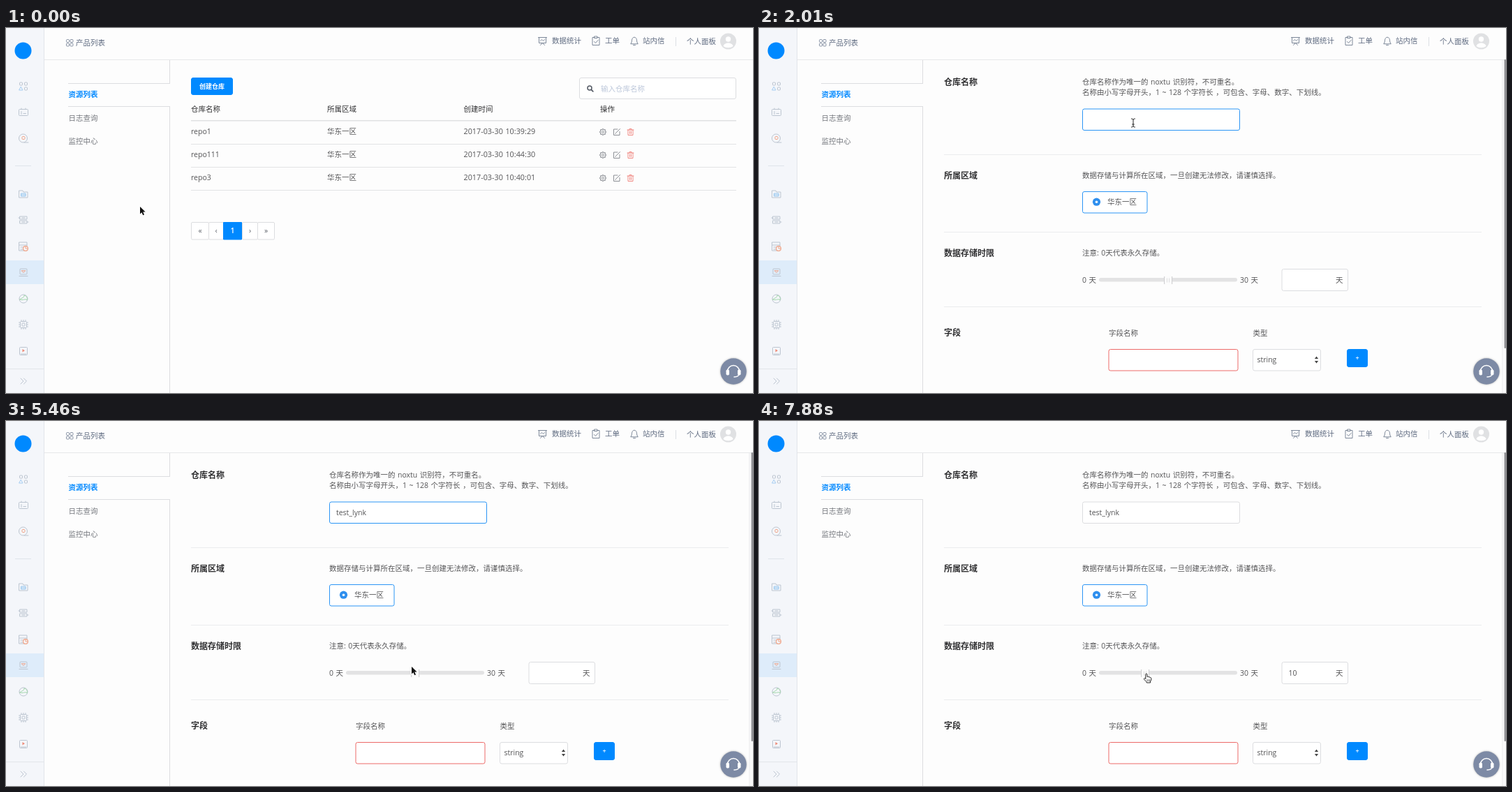
An HTML page with a canvas that plays this animation: 1070x523 px, repeating every 8000 ms.

```html
<!DOCTYPE html>
<html lang="zh-CN">
<head>
<meta charset="utf-8">
<title>创建仓库</title>
<style>
html, body { margin: 0; width: 100%; height: 100%; overflow: hidden; background: #fdfdfd; }
canvas { display: block; width: 1070px; height: 523px; }
</style>
</head>
<body>
<canvas id="stage"></canvas>
<script>
const W = 1070, H = 523, LOOP = 8000;
const BLUE = '#0089ff', INK = '#545456', DARK = '#303032', NAVY = '#5f6b80', RULE = '#e7e8ea', EDGE = '#dcdde0';
const ICON = '#bcc5d0', ORANGE = '#f0a488', RED = '#f08a84';
const FONT = '"Open Sans", "Noto Sans CJK SC", "Noto Sans CJK", sans-serif';

const canvas = document.getElementById('stage');
const c = canvas.getContext('2d');
const dpr = window.devicePixelRatio || 1;
canvas.width = W * dpr;
canvas.height = H * dpr;
c.wordSpacing = '0.8px';

// ---- helpers ----
function text(s, x, y, color = INK, size = 10.5, weight = 400, align = 'left') {
  c.font = `${weight} ${size}px ${FONT}`;
  c.textAlign = align;
  c.fillStyle = color;
  c.fillText(s, x, y + size * 0.37);
}
function rect(x, y, w, h, color) {
  c.fillStyle = color;
  c.fillRect(x, y, w, h);
}
function box(x, y, w, h, fill, stroke, r = 2.5) {
  c.beginPath();
  c.roundRect(x + 0.5, y + 0.5, w - 1, h - 1, r);
  paint(fill, stroke, 1);
}
function pill(x, y, w, h, r, fill) {
  c.beginPath();
  c.roundRect(x, y, w, h, r);
  paint(fill);
}
function paint(fill, stroke, width = 1) {
  if (fill) { c.fillStyle = fill; c.fill(); }
  if (stroke) { c.strokeStyle = stroke; c.lineWidth = width; c.stroke(); }
}
function disc(x, y, r, fill, stroke, width) {
  c.beginPath();
  c.arc(x, y, r, 0, Math.PI * 2);
  paint(fill, stroke, width);
}
// SVG path drawn with its own origin at x, y
function shape(d, x, y, stroke, fill, width = 1) {
  const p = new Path2D(d);
  c.save();
  c.translate(x, y);
  c.lineJoin = c.lineCap = 'round';
  if (fill) { c.fillStyle = fill; c.fill(p); }
  if (stroke) { c.strokeStyle = stroke; c.lineWidth = width; c.stroke(p); }
  c.restore();
}

// ---- timeline: value holds until the next key ----
function at(keys, t) {
  let k = keys[0];
  for (const next of keys) if (next[0] <= t) k = next;
  return k;
}
const pointer = [
  [0, 'arrow', 192, 256], [150, 'arrow', 222, 205], [300, 'arrow', 272, 112], [480, 'hand', 288, 81],
  [780, 'arrow', 407, 135], [930, 'arrow', 437, 136], [1080, 'beam', 510, 137], [1260, 'beam', 536, 136],
  [4710, 'beam', 537, 141], [4860, 'arrow', 544, 168], [5010, 'arrow', 556, 226], [5160, 'arrow', 568, 290],
  [5310, 'arrow', 577, 335], [5460, 'arrow', 581, 352], [5610, 'hand', 579, 356], [5760, 'hand', 579, 357],
  [6060, 'hand', 577, 358], [6210, 'hand', 571, 359], [6360, 'hand', 565, 360], [6500, 'hand', 562, 360],
  [6680, 'hand', 560, 360], [6980, 'hand', 558, 360], [7130, 'hand', 557.5, 360.5], [7430, 'hand', 555, 361],
  [7580, 'hand', 553, 361], [7880, 'hand', 551, 361.5]
];
const typed = [[0, 0], [2310, 1], [2460, 2], [2610, 4], [3210, 5], [3510, 6], [3810, 7], [3960, 8], [4110, 9]];
const caret = [[0, 0], [1560, 1], [2010, 0], [2310, 1], [4710, 0], [5160, 1], [5460, 0], [5760, 1], [6060, 0]];
const days = [[0, 15], [6210, 14], [6500, 13], [6680, 12], [6980, 11], [7880, 10]];

// ---- page frame ----
function sideIcons() {
  const x = 25;
  for (const [dx, dy] of [[-3.5, -3], [3.5, -3], [3.5, 4]]) box(x + dx - 2.5, 83 + dy - 2.5, 5, 5, null, ICON, 1);
  shape('M-3.5 1.5L-1 6H-6Z', x, 83, '#a5cdf2');
  box(18, 116, 14, 10, null, ICON, 1);
  shape('M-3 -1.5V2.5M0 1.5H3.5M-3 -5V-6M3 -5V-6', x, 121, ICON);
  disc(x - 0.5, 158, 6, null, ICON, 1);
  disc(x, 157.5, 2.2, null, ORANGE, 1);
  shape('M1 6H7', x, 158, ICON);
  rect(13, 197, 23, 1, '#dfe4ea');
  shape('M-6 -5H-1L0 -3H6V5H-6Z', x, 238, ICON);
  shape('M-3 -1H3V3H-3ZM-3 1H3', x, 238, '#95c6ef');
  shape('M-5 -5H5V-1H-5ZM-5 1H5V5H-5ZM-7 -3H-5M5 3H7M-2 -3H2M-2 3H2', x, 275, ICON);
  shape('M-6 -6H5V6H-6ZM-6 -2H5M-4 1H0M-4 4H0', x, 313, ICON);
  disc(28, 316, 3.4, '#f5f7fa', ORANGE, 1.2);
  shape('M0 -3V0H3', 28, 316, ORANGE);
  box(19.5, 344.5, 11, 9, null, ICON, 1);
  shape('M-2.5 -2L0 0.5L2.5 -2Z', x, 350, ORANGE);
  shape('M-6 5.5H6', x, 350, ICON);
  disc(x, 388, 6, null, ICON, 1);
  shape('M-5 1C-2 -2 1 -1 1 -5C5 -4 6 -1 5 2C2 -1 0 3 -5 1Z', x, 388, '#9fd6a8');
  box(20, 420, 10, 10, null, ICON, 1);
  box(22.5, 422.5, 5, 5, null, ICON, 0.5);
  shape('M-3 -6.5V-5M0 -6.5V-5M3 -6.5V-5M-3 5V6.5M0 5V6.5M3 5V6.5M-6.5 -3H-5M-6.5 0H-5M-6.5 3H-5M5 -3H6.5M5 0H6.5M5 3H6.5', x, 425, ICON);
  box(19, 457, 12, 12, null, ICON, 1);
  shape('M-1.5 -3L2 -0.8L-1.5 1.5Z', x, 463, null, '#ee8b78');
  shape('M-4 4H4', x, 463, ICON);
  shape('M-4 -4L0 0L-4 4M0.5 -4L4.5 0L0.5 4', x, 506, ICON);
}

function frame() {
  rect(0, 0, W, H, '#fdfdfd');
  rect(0, 0, 54, H, '#f4f6fa');
  rect(0, 333, 54, 34, '#deecfa');
  rect(54, 0, 1, H, '#e2e5ea');
  rect(0, 488, 54, 1, '#e2e5ea');
  disc(24.5, 32.5, 12, BLUE);
  sideIcons();

  rect(55, 45, W - 55, 1, RULE);
  for (const [x, y] of [[86, 16], [91.5, 16], [86, 21.5], [91.5, 21.5]]) box(x, y, 5, 5, null, '#8a95a6', 1);
  text('产品列表', 100, 21.5, NAVY);

  const tool = '#7d8899';
  shape('M-6 -5H6M-5 -5V3H5V-5M-3 0L-1 -2L1 0L3 -2M0 3L-3 6M0 3L3 6', 768.5, 18.5, tool);
  text('数据统计', 782, 18.5, NAVY);
  shape('M-2 -5H-5V6H5V-5H2M-2 -6.5H2V-4H-2ZM-2.5 1L-0.5 3L3 -1', 845, 18.5, tool);
  text('工单', 858, 18.5, NAVY);
  shape('M-5 4C-3 2 -4 -1 -3 -3C-2 -6 2 -6 3 -3C4 -1 3 2 5 4ZM-1.5 6H1.5', 900, 18.5, tool);
  text('站内信', 912, 18.5, NAVY);
  rect(959, 13, 1, 13, '#dcdfe4');
  text('个人面板', 975, 19.5, NAVY);
  disc(1034.5, 19, 11.5, '#e0e1e3');
  disc(1034.5, 16, 3.7, '#fff');
  shape('M-7 7C-6 1 6 1 7 7C3 10 -3 10 -7 7Z', 1034.5, 19, null, '#fff');

  rect(234, 46, 1, 33, EDGE);
  rect(89, 79, 146, 1, EDGE);
  rect(89, 112, 146, 1, EDGE);
  rect(234, 112, 1, H - 112, EDGE);
  text('资源列表', 89.5, 95.5, BLUE, 10.5, 600);
  text('日志查询', 89.5, 129, '#74777d');
  text('监控中心', 89.5, 162.5, '#74777d');
}

function helpButton() {
  c.save();
  c.shadowColor = 'rgba(0,0,0,.3)';
  c.shadowBlur = 3 * dpr;
  disc(1042, 492, 18.7, '#7d8aa5');
  c.restore();
  shape('M-8.5 1A8.5 8.5 0 0 1 8.5 1M8.5 4C8 7.5 5 9 1 9', 1042, 491, '#fff', null, 1.6);
  pill(1031.5, 489.5, 4.5, 8, 1.8, '#fff');
  pill(1048, 489.5, 4.5, 8, 1.8, '#fff');
}

// ---- repository list ----
function listPage(hover) {
  box(265, 71, 60, 25, hover ? '#0079e3' : BLUE, BLUE);
  text('创建仓库', 295, 83.5, '#fff', 9, 600, 'center');
  box(821, 71, 225, 31, '#fff', EDGE);
  disc(836, 86, 3, null, '#555b66', 1.5);
  shape('M0 0L2.5 2.5', 838.3, 88.3, '#555b66', null, 1.8);
  text('输入仓库名称', 852, 87, '#bcc7da');

  [['仓库名称', 265], ['所属区域', 460], ['创建时间', 655.5], ['操作', 851]]
    .forEach(([s, x]) => text(s, x, 116.5, DARK, 10.5, 500));
  rect(265, 132, 781, 1.5, '#e0e1e3');
  [['repo1', '10:39:29'], ['repo111', '10:44:30'], ['repo3', '10:40:01']].forEach(([name, time], i) => {
    const y = 148 + i * 33;
    text(name, 265, y);
    text('华东一区', 460, y);
    text('2017-03-30 ' + time, 655.5, y, INK, 10.8);
    rect(265, y + 18, 781, 1, '#e2e3e5');
    rowIcons(y + 1);
  });

  [['«', 265, 26], ['‹', 290, 22], ['1', 311, 27], ['›', 338, 23], ['»', 360, 25]].forEach(([s, x, w]) => {
    const on = s === '1';
    box(x, 278, w, 25.5, on ? BLUE : '#fff', on ? BLUE : EDGE, on ? 0 : 1.5);
    text(s, x + w / 2, 290.5, on ? '#fff' : '#5c6068', 10.5, on ? 600 : 400, 'center');
  });
}
function rowIcons(y) {
  const grey = '#8c8f95';
  disc(855, y, 4, null, grey, 1);
  disc(855, y, 1.6, null, grey, 0.9);
  for (let a = 0; a < 8; a++) {
    const u = Math.cos(a * Math.PI / 4), v = Math.sin(a * Math.PI / 4);
    shape(`M${u * 4} ${v * 4}L${u * 4.8} ${v * 4.8}`, 855, y, grey);
  }
  shape('M1 -4H-4.5V4.5H4V-0.5M-1.5 1.5L4.5 -4.5M-1.5 1.5L-2 2.5', 875, y, grey);
  shape('M-4.5 -3H4.5M-1.5 -3V-4.5H1.5V-3M-3.5 -3V4.5H3.5V-3M-1 -1V2.5M1 -1V2.5', 894.5, y, RED);
}

// ---- creation form ----
function slider(v) {
  const x = 487 + v * 6.6;
  pill(487, 358, 198, 5.5, 2.7, '#e3e3e4');
  pill(x - 6, 355, 12, 13, 1.5, '#fcfcfc');
  for (const d of [-6, 5]) rect(x + d, 356, 1.2, 11, '#d2d2d4');
  for (const d of [-2, 1]) rect(x + d, 358.5, 1, 6, '#dcdcde');
}

function formPage(t) {
  rect(1064.5, 46, 1, H - 46, '#e6e6e8');
  rect(1065.5, 46, 5, H - 46, '#fafafa');
  pill(1067.5, 45, 2.5, 414, 1.2, '#929296');

  [['仓库名称', 78], ['所属区域', 212], ['数据存储时限', 323], ['字段', 436.5]]
    .forEach(([s, y]) => text(s, 265, y, DARK, 12, 600));
  for (const y of [181, 292, 399]) rect(265, y, 770, 1, '#ebecee');

  text('仓库名称作为唯一的 noxtu 识别符，不可重名。', 463, 77.5);
  text('名称由小写字母开头，1 ~ 128 个字符长 ，可包含、字母、数字、下划线。', 463, 92.5);
  const focused = t >= 1560 && t < 6060;
  box(463, 115.5, 226, 31.5, '#fff', focused ? (t < 1710 ? '#7dbff8' : '#2b95f5') : EDGE);
  const name = 'test_lynk'.slice(0, at(typed, t)[1]);
  text(name, 473, 131.5);
  if (at(caret, t)[1]) rect(473 + c.measureText(name).width, 124, 1, 15, '#444');

  text('数据存储与计算所在区域，一旦创建无法修改，请谨慎选择。', 463, 211.5);
  box(463, 234, 93.5, 31.5, '#fff', '#2b95f5');
  disc(483.5, 249.2, 5.6, '#2f8fee');
  disc(483.5, 249.2, 1.8, '#fff');
  text('华东一区', 499, 249.5);

  const v = at(days, t)[1];
  text('注意: 0天代表永久存储。', 463, 322.5);
  text('0 天', 463, 361);
  slider(v);
  text('30 天', 689, 361);
  box(748.5, 345, 95.5, 32, '#fff', EDGE);
  if (t >= 6060) text(String(v), 758.5, 361.5);
  text('天', 826, 361.5);

  text('字段名称', 501, 437);
  text('类型', 707.5, 437);
  box(500.5, 460, 186, 31.5, '#fff', '#ec6a68');
  box(707, 460, 98, 31.5, '#fff', EDGE);
  text('string', 713.5, 475.5);
  shape('M-2.6 -1.5L0 -5L2.6 -1.5ZM-2.6 1.5L0 5L2.6 1.5Z', 798.5, 475.5, null, '#444');
  box(842, 460, 30, 26, BLUE, BLUE);
  text('+', 857, 472.5, '#fff', 9, 600, 'center');

  if (t >= 2310 && t < 3210) {
    box(462, 147, 227, 56, '#fff', '#d0d1d4', 0);
    text('test1', 473, 162);
    text('test2', 473, 187);
  }
}

// ---- pointer ----
function drawPointer([, kind, x, y]) {
  if (kind === 'arrow') {
    const d = 'M0 0V10.5L2.4 8.2L4.2 12.2L6 11.4L4.3 7.5H7.6Z';
    shape(d, x, y, '#fff', null, 2);
    shape(d, x, y, null, '#111');
  } else if (kind === 'beam') {
    shape('M-2.5 -6C-1 -6 0 -5.5 0 -4.5C0 -5.5 1 -6 2.5 -6M0 -4.5V4.5M-2.5 6C-1 6 0 5.5 0 4.5C0 5.5 1 6 2.5 6M-1.3 2H1.3', x, y, '#222');
  } else {
    shape('M2.8 7.5V1.6C2.8 0.2 5 0.2 5 1.6V5C6 4.4 7 4.8 7 5.5C8 4.9 9 5.3 9 6.1C10 5.7 10.8 6.3 10.8 7.2V9.5L9.6 11.5V13.5H4.3L3.8 12L0.6 8.6C-0.2 7.4 1.2 6.4 2.8 7.5Z', x, y, '#222', '#fff');
    shape('M5 9V11.3M6.8 9V11.3M8.5 9V11.3', x, y, '#444', null, 0.7);
  }
}

function draw(now) {
  const t = now % LOOP;
  c.setTransform(dpr, 0, 0, dpr, 0, 0);
  frame();
  if (t < 780) listPage(t >= 480);
  else formPage(t);
  helpButton();
  drawPointer(at(pointer, t));
}

let start;
function tick(now) {
  start ??= now;
  draw(now - start);
  requestAnimationFrame(tick);
}
draw(0);
requestAnimationFrame(tick);
</script>
</body>
</html>
```
